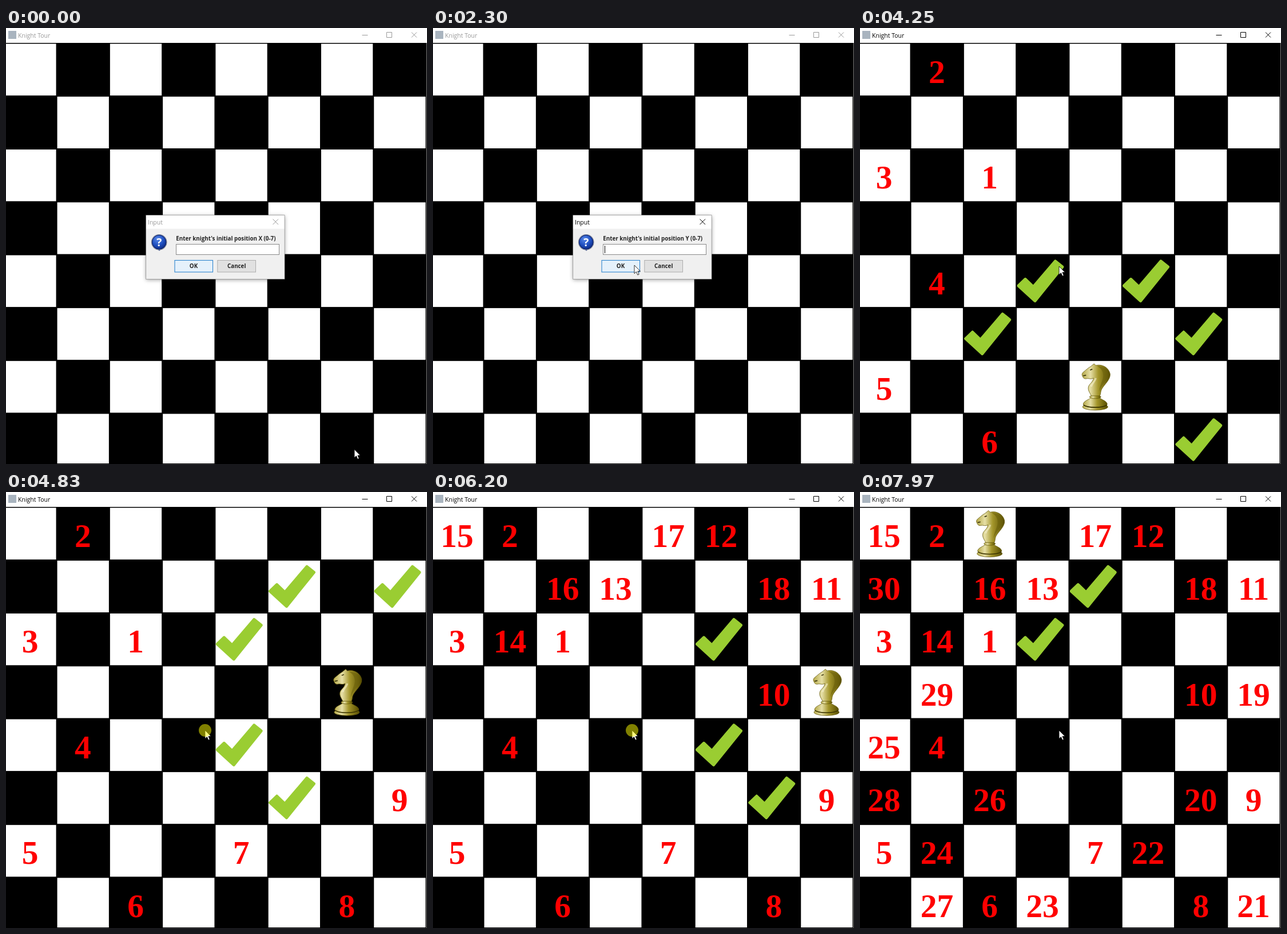
Write an HTML page that moves like this. It is 736 px wide and 761 px high and loops after 8 s.

```html
<!DOCTYPE html>
<html lang="en">
<head>
<meta charset="utf-8">
<title>Knight Tour</title>
<style>
  html, body { margin: 0; width: 100%; height: 100%; overflow: hidden; background: #fff; }
  svg { display: block; width: 736px; height: 761px; }
  .ui { font: 10.5px "Open Sans", "Noto Sans", sans-serif; }
  .bold { font: bold 9.8px "Open Sans", "Noto Sans", sans-serif; fill: #222; }
  .num { font: bold 57.5px "Liberation Serif", serif; fill: #f00; text-anchor: middle; }
  .mid { text-anchor: middle; }
</style>
</head>
<body>
<svg viewBox="0 0 736 761" xmlns="http://www.w3.org/2000/svg">
  <defs>
    <linearGradient id="gold">
      <stop offset="0" stop-color="#b5a94a"/>
      <stop offset=".3" stop-color="#e6dfa6"/>
      <stop offset=".58" stop-color="#a3952a"/>
      <stop offset="1" stop-color="#574d00"/>
    </linearGradient>
    <radialGradient id="blue" cx=".4" cy=".3" r=".75">
      <stop offset="0" stop-color="#5b8ae8"/>
      <stop offset=".55" stop-color="#1f4fc0"/>
      <stop offset="1" stop-color="#0a2478"/>
    </radialGradient>
    <filter id="shade" x="-10%" y="-15%" width="120%" height="135%">
      <feDropShadow dx="0" dy="1.5" stdDeviation="3.5" flood-opacity=".4"/>
    </filter>
    <path id="check" d="M4 54.5 16 43 30 56.5 68.5 11.5 81 21.5 33 81Z"
      fill="#9acd32" stroke="#9acd32" stroke-width="5" stroke-linejoin="round"/>
    <g id="knight" stroke="#665b0c" stroke-width=".8" fill="url(#gold)">
      <ellipse cx="46" cy="81.3" rx="22" ry="5.8"/>
      <path d="M25 77C25 71 35 69 39 65L53 65C57 69 67 71 67 77C62 84 30 84 25 77Z"/>
      <path d="M25.5 78C33 83.5 59 83.5 66.5 78" fill="none" stroke="#3c3500" stroke-width="1.6"/>
      <ellipse cx="46" cy="64" rx="10" ry="2.8"/>
      <path d="M39 62C37 57 33 53 34 47C35 41 42 39 43 31C38 34 35 31 31 32C27 33 25 31 24 28
        C22 25 23 22 26 20C31 16 34 13 38 11L44 6 47 9C58 6 70 13 72 24C73 34 61 43 57 51C55 55 56 59 54 62Z"/>
      <path d="M49 10C62 10 70 18 69 26C66 37 57 42 53 55C53 44 60 35 60 27C60 18 55 13 49 10Z"
        fill="#6b600a" stroke="none" opacity=".55"/>
      <path d="M37 17l4-1.5M25 27l5-1" fill="none" stroke="#2c2700" stroke-width="1.5"/>
      <path d="M39 46C40 40 46 37 47 31" fill="none" stroke="#f6f2cf" stroke-width="3" opacity=".6"/>
    </g>
  </defs>

  <rect width="736" height="761" fill="#fff"/>
  <g id="bar">
    <rect x="4" y="5" width="14" height="14" fill="#a9b4bf"/>
    <text class="ui" x="21" y="17" fill="currentColor">Knight Tour</text>
    <path d="M622.5 12.5h10M665.5 7.5h9v9h-9ZM709 7.5l9 9m0-9l-9 9" fill="none" stroke="currentColor"/>
  </g>
  <g id="board"></g>
  <g id="marks"></g>

  <g id="dialog">
    <rect x="245" y="327" width="242" height="111" fill="#f0f0f0" filter="url(#shade)"/>
    <rect x="245" y="327" width="242" height="23.5" fill="#fff"/>
    <rect x="244.7" y="326.7" width="242.4" height="111.6" fill="none" stroke="#8a8a8a" stroke-width=".7"/>
    <g id="caption">
      <text class="ui" x="248" y="343" fill="currentColor">Input</text>
      <path d="M466.5 333.5l9.5 9.5m0-9.5l-9.5 9.5" stroke="currentColor"/>
    </g>
    <path d="M264 385l4 4 4-4Z" fill="#0a2478"/>
    <circle cx="267.7" cy="373.8" r="13.2" fill="url(#blue)" stroke="#8d93a3" stroke-width="1.4"/>
    <circle cx="267.7" cy="373.8" r="12.2" fill="none" stroke="#0b1f66"/>
    <text x="267.7" y="380.5" class="mid" fill="#fff" style="font:bold 19px 'Open Sans',sans-serif">?</text>
    <text id="label" class="bold" x="297.3" y="371.3"></text>
    <rect x="297.5" y="377.5" width="180" height="18" fill="#fff" stroke="#8a8a8a"/>
    <text id="entry" class="ui" x="300" y="390.3" fill="#222"></text>
    <path id="caret" d="M300.5 380v13" stroke="#000"/>
    <rect id="ok" x="295" y="405.5" width="66.5" height="20.5"/>
    <rect id="focus" x="297.5" y="408" width="61.5" height="15.5" fill="none" stroke="#222" stroke-width=".8" stroke-dasharray="1 1"/>
    <text class="bold mid" x="328" y="419.4">OK</text>
    <rect x="369.8" y="405.5" width="66.7" height="20.5" fill="#e1e1e1" stroke="#adadad"/>
    <text class="bold mid" x="403.2" y="419.4">Cancel</text>
  </g>

  <path id="arrow" d="M0 0V14.6L3.4 11.4 5.8 17 8.2 16 5.9 10.5H10.4Z" fill="#fff" stroke="#000" stroke-width=".8"/>
  <circle id="click" r="11" fill="#ff0" opacity=".5"/>
</svg>

<script>
const LOOP = 8000, PITCH = 92.28, LEAD = 84;
const $ = id => document.getElementById(id);
const cellX = c => -3.9 + c * PITCH;
const cellY = r => 26.3 + r * PITCH;
const within = (t, a, b) => t >= a && t < b;

// squares visited, as column and row
const tour = ("22 10 02 14 06 27 46 67 75 63 71 50 31 12 00 21 40 61 73 65 " +
  "77 56 37 16 04 25 17 05 13 01 20").split(" ").map(s => [+s[0], +s[1]]);

// [move, ms]; moves between are evenly spaced
const beats = [[1, 3310], [6, 4100], [7, 4250], [11, 4890], [12, 5040], [13, 5120],
  [14, 5370], [19, 6130], [24, 6890], [25, 7050], [29, 7670], [30, 7935], [31, 7970]];

// [ms, x, y]
const route = [[70, 609, 735.5], [300, 560, 650], [560, 420, 470], [820, 345, 398], [1340, 345, 398],
  [1480, 348, 424], [1660, 352, 414], [2300, 352, 414], [2600, 348, 416]];

function between(points, x, col) {
  if (x <= points[0][0]) return points[0][col];
  for (let i = 1; i < points.length; i++) {
    const a = points[i - 1], b = points[i];
    if (x <= b[0]) return a[col] + (b[col] - a[col]) * (x - a[0]) / (b[0] - a[0]);
  }
  return points[points.length - 1][col];
}

const moveTimes = tour.map((_, i) => between(beats, i + 1, 1));

function drawBoard() {
  let s = '<rect y="26" width="735.5" height="735"/>';
  for (let r = 0; r < 8; r++)
    for (let c = r % 2; c < 8; c += 2) {
      const x = cellX(c) + 1.2, y = cellY(r) + 1.2;
      const h = Math.min(PITCH - 2, 760 - y);
      s += `<rect x="${x}" y="${y}" width="${PITCH - 2}" height="${h}" fill="#fff"/>`;
    }
  $("board").innerHTML = s;
}

const place = (id, [c, r]) => `<use href="#${id}" x="${cellX(c)}" y="${cellY(r)}"/>`;

function drawMarks(count) {
  if (!count) return "";
  const seen = tour.slice(0, count);
  const [kc, kr] = seen[count - 1];
  let s = seen.slice(0, -1).map(([c, r], i) =>
    `<text class="num" x="${cellX(c) + 46}" y="${cellY(r) + 69.4}">${i + 1}</text>`).join("");
  for (let r = 0; r < 8; r++)
    for (let c = 0; c < 8; c++) {
      const jump = Math.abs(c - kc) * Math.abs(r - kr) === 2;
      if (jump && !seen.some(p => p[0] === c && p[1] === r)) s += place("check", [c, r]);
    }
  return s + place("knight", [kc, kr]);
}

function clicking(t) {
  if (within(t, 900, 1000) || within(t, 1850, 1930) || within(t, 2780, 2890)) return true;
  return moveTimes.some((m, i) =>
    within(t, m - LEAD, m) && (!i || m - moveTimes[i - 1] > 100));
}

function drawDialog(t) {
  const second = t >= 2060;
  const open = t < 1930 || within(t, 2060, 2890);
  $("dialog").style.display = open ? "" : "none";
  if (!open) return;
  const active = t >= 910;
  const pressed = within(t, 1750, 1930) || t >= 2770;
  const typed = second ? t >= 2380 : t >= 1220;
  $("caption").style.color = active ? "#000" : "#999";
  $("label").textContent = `Enter knight's initial position ${second ? "Y" : "X"} (0-7)`;
  $("entry").textContent = typed ? "2" : "";
  $("caret").style.display = active && !pressed ? "" : "none";
  $("caret").setAttribute("transform", `translate(${typed ? 6.5 : 0} 0)`);
  $("focus").style.display = pressed ? "" : "none";
  const ok = $("ok");
  ok.setAttribute("fill", pressed ? "#cce4f7" : "#e5f1fb");
  ok.setAttribute("stroke", pressed ? "#2a6ca8" : "#2f86cf");
  ok.setAttribute("stroke-width", pressed ? 1.8 : 1.1);
}

let shown = -1;
function render(t) {
  const mainActive = within(t, 1960, 2060) || t >= 2900;
  $("bar").style.color = mainActive ? "#000" : "#999";
  const count = moveTimes.filter(m => m <= t + 0.01).length;
  if (count !== shown) $("marks").innerHTML = drawMarks(shown = count);
  drawDialog(t);
  const at = `translate(${between(route, t, 1)} ${between(route, t, 2)})`;
  $("arrow").setAttribute("transform", at);
  $("click").setAttribute("transform", at);
  $("click").style.display = clicking(t) ? "" : "none";
}

function tick() {
  render(performance.now() % LOOP);
  requestAnimationFrame(tick);
}

drawBoard();
tick();
</script>
</body>
</html>
```
